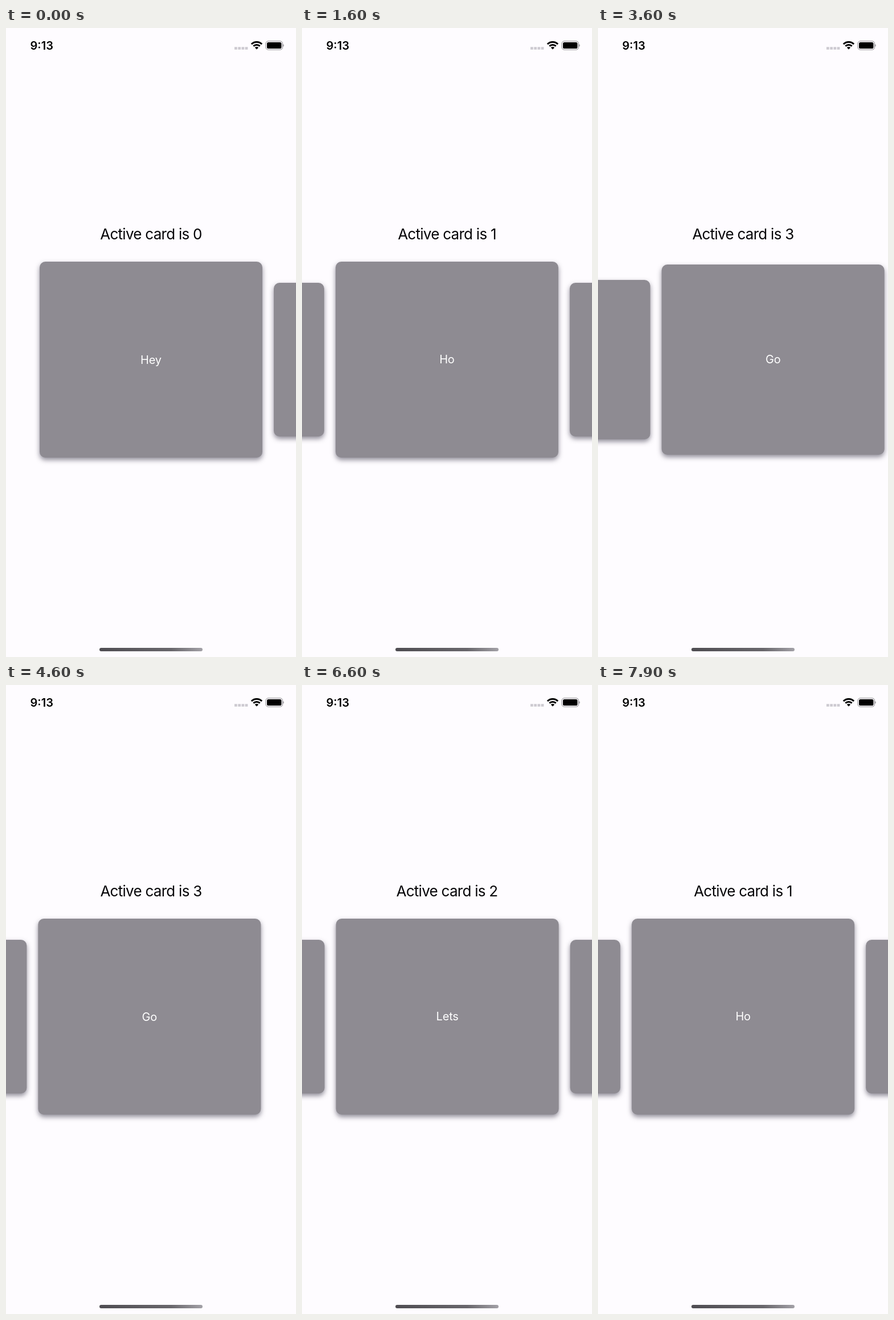
Recreate the animation shown at these times as an HTML page. Size 509 by 1101 pixels, loop 8 s.

```html
<!DOCTYPE html>
<html lang="en">
<head>
<meta charset="utf-8">
<title>Card carousel</title>
<style>
  html, body { margin: 0; width: 100%; height: 100%; overflow: hidden; background: #fefcff; }
  body { position: relative; font-family: Inter, "Open Sans", sans-serif; font-optical-sizing: none; }
  svg { position: absolute; left: 0; top: 0; }
  #title {
    position: absolute; left: 0; top: 344px; width: 509px; line-height: 34px;
    text-align: center; font-size: 26px; letter-spacing: -.028em; color: #060508;
  }
  .card {
    position: absolute; left: 0; width: 391px; border-radius: 10px;
    display: flex; align-items: center; justify-content: center;
    background: #8e8b92; color: #fff; font-size: 20px; letter-spacing: -.01em;
    box-shadow: 0 4px 8px rgba(40, 36, 56, .52);
  }
</style>
</head>
<body>
<svg width="509" height="1101" viewBox="0 0 509 1101">
  <defs>
    <linearGradient id="bar">
      <stop offset="0" stop-color="#4f4d52"/>
      <stop offset=".7" stop-color="#69676c"/>
      <stop offset="1" stop-color="#a3a1a7"/>
    </linearGradient>
  </defs>
  <text x="42.5" y="37.5" font-size="20" font-weight="600">9:13</text>
  <path d="M401 35.5H425" stroke="#cdcad1" stroke-width="4.6" stroke-dasharray="4.8 1.4"/>
  <g fill="none" stroke="#000" stroke-width="3">
    <path d="M430.8 28.3a13 13 0 0 1 18.4 0M434.3 31.8a8 8 0 0 1 11.4 0"/>
    <path d="M440 37.5l-3.2-3.2a4.5 4.5 0 0 1 6.4 0z" fill="#000" stroke="none"/>
  </g>
  <rect x="456" y="23" width="29.5" height="15" rx="4.2" fill="none" stroke="#858388"/>
  <rect x="458" y="25" width="25.5" height="11" rx="2.6"/>
  <path d="M486.5 28q2.4 2.5 0 5z" fill="#77757a"/>
  <rect x="164" y="1085" width="181" height="6" rx="3" fill="url(#bar)"/>
</svg>
<div id="title"></div>
<script>
  const LOOP = 8000, STEP = 100;
  const PITCH = 411, LEFT = 59, MIDDLE = 580.5;
  const SMALL = 269, GROWTH = 74;
  const DRAG = 0.22, POWER = 2.6, STIFFNESS = 9;

  // Each swipe: start in ms, card dragged from, card settled on, drag length in cards.
  const swipes = [
    [460, 0, 1, .5],
    [1870, 1, 2, .5],
    [3270, 2, 3, .5],
    [4550, 3, 3, .3],
    [5770, 3, 2, -.5],
    [6850, 2, 1, -.5]
  ];

  const title = document.getElementById("title");
  const cards = ["Hey", "Ho", "Lets", "Go"].map(label => {
    const card = document.createElement("div");
    card.className = "card";
    card.textContent = label;
    document.body.append(card);
    return card;
  });

  // Accelerating drag, then a critically damped spring that keeps the release speed.
  function scrollAt(ms) {
    const swipe = swipes.findLast(([start]) => start <= ms);
    if (!swipe) return 0;
    const [start, from, to, pull] = swipe;
    const seconds = (ms - start) / 1000;
    if (seconds < DRAG) return from + pull * (seconds / DRAG) ** POWER;
    const since = seconds - DRAG;
    const offset = from + pull - to;
    const speed = pull * POWER / DRAG;
    return to + (offset + (speed + STIFFNESS * offset) * since) * Math.exp(-STIFFNESS * since);
  }

  function draw(ms) {
    const scroll = scrollAt(ms);
    const focus = Math.min(3, Math.max(0, scroll));
    title.textContent = "Active card is " + Math.round(focus);
    cards.forEach((card, i) => {
      const height = SMALL + GROWTH * Math.max(0, 1 - Math.abs(i - focus));
      card.style.height = height + "px";
      card.style.top = MIDDLE - height / 2 + "px";
      card.style.transform = `translateX(${LEFT + (i - scroll) * PITCH}px)`;
    });
  }

  const begin = performance.now();
  function tick() {
    const ms = (performance.now() - begin) % LOOP;
    draw(Math.floor(ms / STEP) * STEP);
    requestAnimationFrame(tick);
  }
  tick();
</script>
</body>
</html>
```
